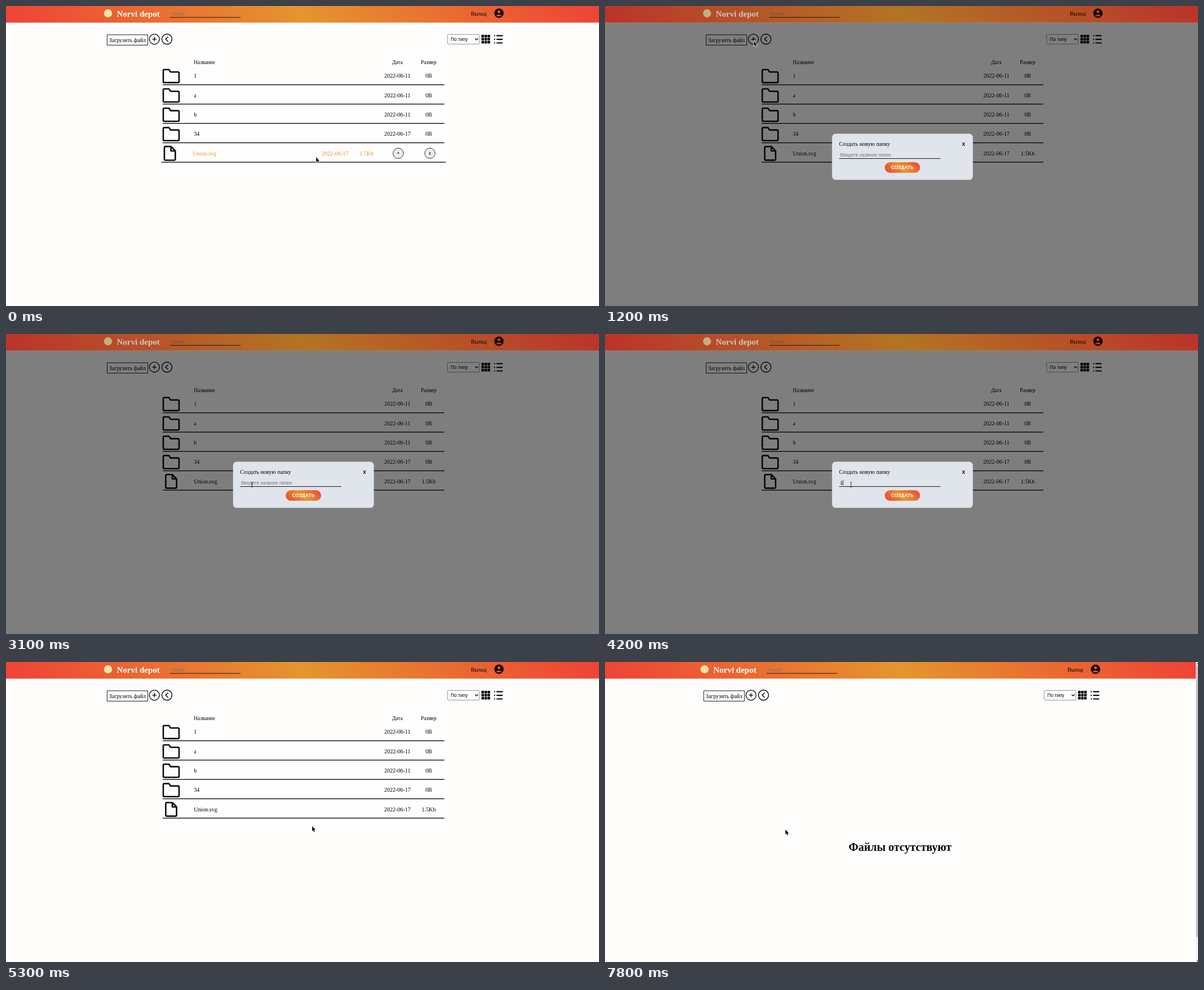
An HTML page with a canvas that plays this animation: 1052x532 px, repeating every 8000 ms.

```html
<!DOCTYPE html>
<html lang="ru">
<head>
<meta charset="utf-8">
<title>Файлы</title>
<style>
html, body { margin: 0; width: 100%; height: 100%; overflow: hidden; background: #fffefd; }
canvas { display: block; width: 1052px; height: 532px; }
</style>
</head>
<body>
<canvas id="stage" width="1052" height="532"></canvas>
<script>
const ctx = document.getElementById('stage').getContext('2d');
const W = 1052, H = 532, LOOP = 8000, HEADER = 29.5;
const RED = '#ef4136', ORANGE = '#e5952e', INK = '#000', PAGE = '#fffefd';
const SERIF = '"Liberation Serif", "Times New Roman", serif';
const SANS = '"Liberation Sans", Arial, sans-serif';

const OPEN = 1200, CLOSE = 5300, CREATED = 5500, ENTERED = 7600;
const FILES = [
  ['1', '2022-06-11', '0B'],
  ['a', '2022-06-11', '0B'],
  ['b', '2022-06-11', '0B'],
  ['34', '2022-06-17', '0B'],
  ['Union.svg', '2022-06-17', '1.5Kb'],
  ['11', '2022-06-17', '0B']
];
const ROW_Y = 124, ROW_STEP = 34.3;

const FOLDER = new Path2D('M-12-11.3H-4L-1-7H12q2 0 2 2V9.9q0 2-2 2H-12q-2 0-2-2V-9.3q0-2 2-2Z');
const FILE = new Path2D('M-7.6-12H2L9.6-4.2V10.2q0 2-2 2H-7.6q-2 0-2-2V-10q0-2 2-2ZM2-12V-4.2H9.6');
const ARROW = new Path2D('M0 0V9L2.1 7.2 3.5 10.4 5 9.8 3.6 6.7 6.3 6.6Z');
const HAND = new Path2D('M.4 5.2V.2q0-1.1 1-1.1t1 1.1V3.2l3.4.7q1.4.3 1.3 1.7L6.6 8.2V10H1.4V8.8L-1.2 5.6q-.3-1 .7-1Z');

// One pointer position per 100 ms from the start of each move.
const ease = k => k * k * (3 - 2 * k);
const glide = (count, [x0, y0], [x1, y1]) => Array.from({ length: count }, (_, i) => {
  const k = ease((i + 1) / count);
  return [x0 + (x1 - x0) * k, y0 + (y1 - y0) * k];
});
const MOVES = [
  [0, [[550, 268]]],
  [100, [[549, 268]]],
  [400, glide(6, [549, 268], [264, 64])],
  [1100, [[264, 62]]],
  [1600, glide(8, [264, 62], [436.5, 267])],
  [4500, [[440, 275], [458, 300], [485, 322], [510, 326], [530, 311], [541, 294], [542.5, 290]]],
  [5300, [[543, 291]]],
  [5700, [[530, 306], [500, 340], [465, 355], [425, 348], [380, 322], [345, 290], [322, 268], [312, 286], [310, 302]]],
  [6700, [[312, 302], [313, 304], [314, 305]]],
  [7200, [[320, 297]]]
];

function pointerAt(t) {
  const [start, points] = MOVES.filter(move => move[0] <= t).pop();
  return points[Math.min(points.length - 1, Math.floor((t - start) / 100))];
}

function text(s, x, y, size, { font = SERIF, color = INK, align = 'left', weight = 'normal' } = {}) {
  ctx.font = `${weight} ${size}px ${font}`;
  ctx.fillStyle = color;
  ctx.textAlign = align;
  ctx.fillText(s, x, y);
}

function rect(x, y, w, h, color) {
  ctx.fillStyle = color;
  ctx.fillRect(x, y, w, h);
}

function shape(build, fill, stroke, width = 1) {
  ctx.beginPath();
  build();
  if (fill) { ctx.fillStyle = fill; ctx.fill(); }
  if (stroke) { ctx.strokeStyle = stroke; ctx.lineWidth = width; ctx.stroke(); }
}

const circle = (x, y, r, fill, stroke, width) =>
  shape(() => ctx.arc(x, y, r, 0, Math.PI * 2), fill, stroke, width);
const rounded = (x, y, w, h, r, fill, stroke, width) =>
  shape(() => ctx.roundRect(x, y, w, h, r), fill, stroke, width);
const polyline = (points, width, color = INK) =>
  shape(() => points.forEach(p => ctx.lineTo(...p)), null, color, width);

function at(x, y, scale, draw) {
  ctx.save();
  ctx.translate(x, y);
  ctx.scale(scale, scale);
  draw();
  ctx.restore();
}

// Red, orange, red along a 45 degree axis, like a CSS gradient on this box.
function warmGradient(x, y, w, h) {
  const cx = x + w / 2, cy = y + h / 2, d = (w + h) / 4;
  const g = ctx.createLinearGradient(cx - d, cy + d, cx + d, cy - d);
  g.addColorStop(0, RED);
  g.addColorStop(0.5, ORANGE);
  g.addColorStop(1, RED);
  return g;
}

function drawHeader(width, shift) {
  const back = warmGradient(0, 0, width, HEADER);
  rect(0, 0, width, HEADER, back);
  ctx.save();
  ctx.translate(shift, 0);
  circle(181, 13, 7.2, '#f4e3a1');
  text('Norvi depot', 196.5, 18.6, 15, { color: '#fff', weight: 'bold' });
  text('Поиск..', 293, 16.8, 8.33, { font: SANS, color: '#8a7355' });
  rect(291, 19.7, 125, 0.9, '#1a120a');
  text('Выход', 824.7, 17, 10);
  circle(874.5, 12.8, 8.3, '#0b0b0b');
  circle(874.5, 10.3, 2.6, '#ee4a35');
  shape(() => ctx.ellipse(874.5, 18.3, 5, 3.3, 0, Math.PI, 0), '#ee4a35');
  ctx.restore();
}

function drawToolbar(shift) {
  ctx.save();
  ctx.translate(shift, 0);
  ctx.lineCap = 'butt';
  shape(() => ctx.rect(179.4, 51, 72.2, 18.4), null, INK, 0.9);
  text('Загрузить файл', 182.7, 64, 10);

  circle(263.3, 58.8, 9, null, INK, 1.3);
  polyline([[259.6, 58.8], [267, 58.8]], 1.3);
  polyline([[263.3, 55.1], [263.3, 62.5]], 1.3);
  circle(285.5, 58.8, 9, null, INK, 1.4);
  polyline([[287.6, 54.6], [283.2, 58.8], [287.6, 63]], 1.4);

  rounded(783.4, 50.4, 56.2, 17.2, 1.2, '#fff', '#767676', 0.8);
  text('По типу', 789, 61.8, 8.33, { font: SANS });
  polyline([[832.2, 57.5], [834.8, 60.1], [837.4, 57.5]], 1.3);

  for (let i = 0; i < 9; i++)
    rounded(843.4 + i % 3 * 5.4, 51 + Math.floor(i / 3) * 5.4, 4.7, 4.7, 1, '#0b0b0b');
  for (let i = 0; i < 3; i++) {
    const y = 51.6 + i * 6.4;
    rounded(865.7, y, 2.3, 2.2, 1, '#0b0b0b');
    rounded(870, y, 11.2, 2.2, 0.8, '#0b0b0b');
  }
  ctx.restore();
}

function drawButton(label, x) {
  circle(x, 0, 9.1, '#efefef', INK, 0.8);
  text(label, x, 2.7, 8.33, { font: SANS, align: 'center' });
}

function drawRow([name, date, size], index, hovered) {
  const isFile = name.includes('.');
  const color = hovered ? ORANGE : INK;
  const offset = hovered ? -111.1 : 0;
  at(528, ROW_Y + index * ROW_STEP, hovered ? 1.01 : 1, () => {
    ctx.strokeStyle = '#0b0b0b';
    ctx.lineWidth = 2.6;
    ctx.lineJoin = 'round';
    at(-235, 0, 1, () => ctx.stroke(isFile ? FILE : FOLDER));
    text(name, -194.7, 3.4, 10, { color });
    text(date, 166.3 + offset, 3.4, 10, { color, align: 'center' });
    text(size, 221.8 + offset, 3.4, 10, { color, align: 'center' });
    if (hovered) {
      if (isFile) drawButton('+', 166.3);
      drawButton('x', 221.8);
    }
    rect(-250, 15, 499.6, 1.3, INK);
  });
}

function drawList(t, pointer) {
  text('Название', 333.3, 102.9, 9.375);
  text('Дата', 694.3, 102.9, 9.375, { align: 'center' });
  text('Размер', 749.8, 102.9, 9.375, { align: 'center' });
  const inDialog = t >= OPEN && t < CLOSE;
  const [x, y] = pointer;
  const files = t < CREATED ? FILES.slice(0, -1) : FILES;
  files.forEach((file, i) => {
    const dy = y - ROW_Y - i * ROW_STEP;
    drawRow(file, i, !inDialog && x > 278 && x < 778 && dy > -17 && dy < 17);
  });
}

function drawDialog(t) {
  rect(0, 0, W, HEADER, 'rgba(0,0,0,.22)');
  rect(0, HEADER, W, H - HEADER, 'rgba(0,0,0,.5)');
  rounded(402.8, 226.6, 249.8, 81.7, 6.5, '#e0e5ec');
  text('Создать новую папку', 415.3, 248.4, 10);
  text('X', 636, 247.6, 8.33, { font: SANS, weight: 'bold', align: 'center' });

  const typed = t < 4200 ? '' : t < 4300 ? '1' : '11';
  text(typed || 'Введите назвние папки', 417, 266.6, 8.33,
    { font: SANS, color: typed ? INK : '#757575' });
  const caretOn = (t >= 2500 && t < 3100) || (t >= 3700 && t < 4800);
  if (caretOn) rect(417 + (typed ? ctx.measureText(typed).width : 0), 259, 0.9, 9, INK);
  rect(415.3, 270, 179.7, 0.9, INK);

  rounded(496.3, 277, 62.7, 18.8, 9.4, warmGradient(496.3, 277, 62.7, 18.8));
  text('СОЗДАТЬ', 527.6, 289.1, 8.33, { font: SANS, weight: 'bold', color: '#fff', align: 'center' });
}

function drawEmpty() {
  text('Файлы отсутствуют', 523.6, 335, 20, { weight: 'bold', align: 'center' });
  rect(1048, 0, 4, H, '#f1f1f1');
  rect(1048.5, 6.5, 3.5, 481, '#c1c1c1');
  shape(() => { ctx.moveTo(1049.5, 4); ctx.lineTo(1052, 1.5); ctx.lineTo(1052, 4); }, '#505050');
  shape(() => { ctx.moveTo(1049.5, 529); ctx.lineTo(1052, 531.5); ctx.lineTo(1052, 529); }, '#505050');
}

function cursorKind(t, [x, y]) {
  if (t >= OPEN && t < CLOSE) {
    if (x > 415 && x < 595 && y > 256 && y < 271) return 'text';
    return x > 496 && x < 559 && y > 277 && y < 296 ? 'hand' : 'arrow';
  }
  return Math.hypot(x - 263.3, y - 58.8) < 9.5 ? 'hand' : 'arrow';
}

function drawCursor(kind, [x, y]) {
  at(x, y, 1, () => {
    ctx.lineJoin = 'round';
    if (kind === 'text') {
      polyline([[0, -4.5], [0, 4.5]], 1, '#333');
      polyline([[-1.8, -4.5], [1.8, -4.5]], 0.7, '#555');
      polyline([[-1.8, 4.5], [1.8, 4.5]], 0.7, '#555');
      return;
    }
    const path = kind === 'hand' ? HAND : ARROW;
    ctx.lineWidth = kind === 'hand' ? 1 : 1.4;
    ctx.strokeStyle = kind === 'hand' ? '#111' : '#fff';
    ctx.fillStyle = kind === 'hand' ? '#fff' : '#1c1c1c';
    ctx.stroke(path);
    ctx.fill(path);
    if (kind === 'hand')
      for (const fx of [2.6, 4, 5.4]) polyline([[fx, 3.6], [fx, 5]], 0.5, '#333');
  });
}

function draw(t) {
  const pointer = pointerAt(t);
  const empty = t >= ENTERED;
  const shift = empty ? -4.3 : 0;
  rect(0, 0, W, H, PAGE);
  drawHeader(empty ? 1048 : W, shift);
  drawToolbar(shift);
  if (empty) drawEmpty();
  else drawList(t, pointer);
  if (t >= OPEN && t < CLOSE) drawDialog(t);
  drawCursor(cursorKind(t, pointer), pointer);
}

const begin = performance.now();
function tick() {
  draw((performance.now() - begin) % LOOP);
  requestAnimationFrame(tick);
}
tick();
</script>
</body>
</html>
```
